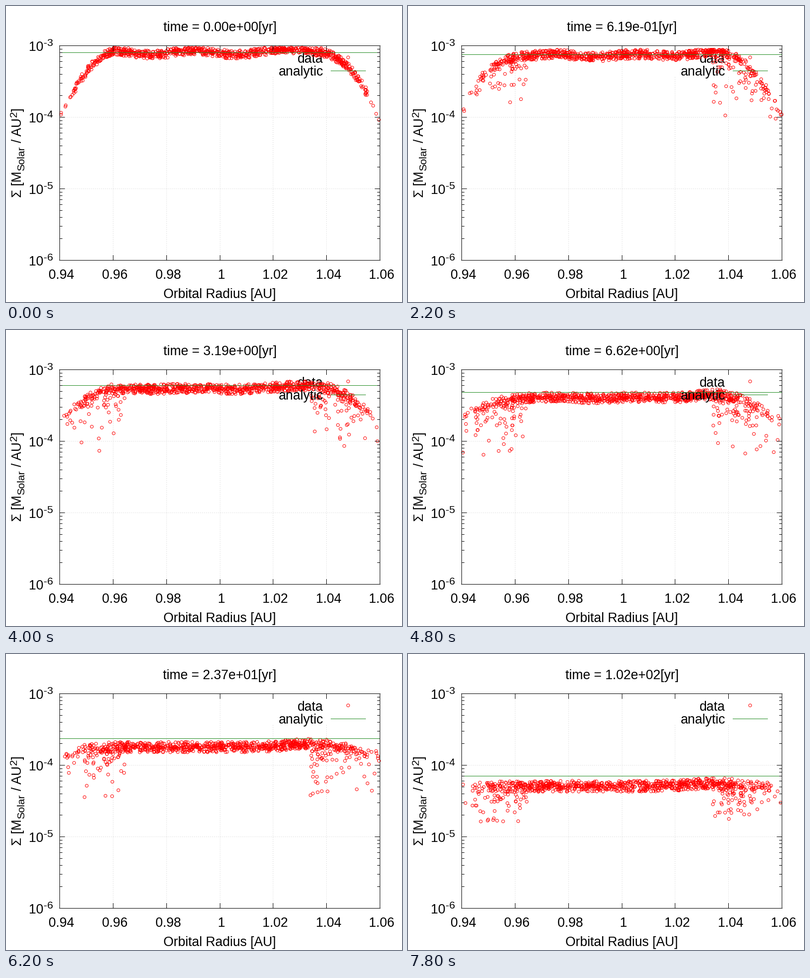
Write a matplotlib script that moves like this. It is 800 by 600 pixels and loops after 8000 ms.

```python
import numpy as np
import matplotlib.pyplot as plt
from matplotlib.animation import FuncAnimation

W, H, DPI = 800, 600, 100
PX = 72 / DPI                      # one pixel in points
FRAMES, STEP = 40, 200
LEFT, RIGHT, TOP, BOTTOM = 108.5, 755.5, 80.5, 515.5
DECADE = (BOTTOM - TOP) / 3
BIG, SMALL = 26.67, 21.33          # font sizes in pixels
RED, GREEN = "#ff0000", "#228b22"

plt.rcParams["font.family"] = "Liberation Sans"

fig = plt.figure(figsize=(W / DPI, H / DPI), dpi=DPI, facecolor="white")
ax = fig.add_axes([0, 0, 1, 1])
ax.set_xlim(0, W)
ax.set_ylim(H, 0)
ax.axis("off")


def crisp(v):
    """Centre of the pixel that holds v."""
    return np.floor(v) + 0.5


def line(x0, y0, x1, y1, color="black", z=5, **kw):
    if x0 == x1:
        x0 = x1 = crisp(x0)
    else:
        y0 = y1 = crisp(y0)
    return ax.plot([x0, x1], [y0, y1], color=color, lw=PX, zorder=z,
                   snap=False, **kw)[0]


def text(x, y, s, ha="left", size=BIG, z=5, rot=0):
    return ax.text(x, y, s, ha=ha, va="baseline", fontsize=size * PX,
                   rotation=rot, rotation_mode="anchor", zorder=z)


def circles(x, y, z=2):
    return ax.scatter(x, y, s=(6 * PX) ** 2, facecolors="none",
                      edgecolors=RED, linewidths=PX, zorder=z)


def grid(x0, y0, x1, y1):
    line(x0, y0, x1, y1, "#c4c4c4", 0, linestyle=(0, (1, 3)), dash_capstyle="butt")


def draw_axes():
    for i in range(7):
        x = LEFT + i * (RIGHT - LEFT) / 6
        line(x, BOTTOM, x, BOTTOM - 10)
        line(x, TOP, x, TOP + 10)
        text(x + 3.7, 553, f"{0.94 + 0.02 * i:.3g}", "center")
        if 0 < i < 6:
            grid(x, 144 if i in (4, 5) else TOP, x, BOTTOM)   # gap behind the key

    for k in range(4):
        y = TOP + k * DECADE
        line(LEFT, y, LEFT + 10, y)
        line(RIGHT, y, RIGHT - 10, y)
        text(46.3, y + 10.5, "10")
        text(76, y + 0.5, f"-{k + 3}", size=SMALL)
        if k in (1, 2):
            grid(LEFT, y, RIGHT, y)
        if k < 3:
            for m in range(2, 10):
                ym = y + DECADE * (1 - np.log10(m))
                line(LEFT, ym, LEFT + 5, ym)
                line(RIGHT, ym, RIGHT - 5, ym)

    for y in (TOP, BOTTOM):
        line(LEFT - 0.5, y, RIGHT + 0.5, y)
    for x in (LEFT, RIGHT):
        line(x, TOP, x, BOTTOM)

    text(432, 592, "Orbital Radius [AU]", "center")
    text(31, 388, "Σ [M", rot=90)
    text(37.5, 334.5, "Solar", size=SMALL, rot=90)
    text(31, 277.3, "/ AU", rot=90)
    text(21.5, 225.4, "2", size=SMALL, rot=90)
    text(31, 213.5, "]", rot=90)


draw_axes()
title = text(432, 51, "", "center")
text(641, 115, "data", "right", z=1)
text(641, 141, "analytic", "right", z=3)
line(656.5, 131.5, 726.5, 131.5, GREEN, 4)
model = line(LEFT, 0, RIGHT, 0, GREEN, 4)
circles([691.2], [104.2])
points = circles([], [])

# Particles of a narrow disc on slightly eccentric orbits
COUNT = 1000
rng = np.random.default_rng(12)
home = rng.uniform(160, 711, COUNT)
swing = rng.rayleigh(37, COUNT)
phase = rng.uniform(0, 2 * np.pi, (3, COUNT))
rate = 2 * np.pi * (0.94 + 0.12 * (home - LEFT) / (RIGHT - LEFT)) ** -1.5


def model_y(t):
    return TOP - DECADE * np.log10(0.8 / (1 + t / 9.87))


def band_depth(x, t):
    """Distance of the particle band below the model line, in pixels."""
    level = 22 * t / (t + 7)
    bump = -6 * np.exp(-((x - 615) / 70) ** 2)
    wave = -4 * np.exp(-t / 8) * np.cos(2 * np.pi * t) * np.cos((x - 380) / 27)
    rim = np.maximum(np.maximum(230 - x, x - 628), 0) / 122
    return level + bump + wave + 125 * rim ** 2 / (1 + t / 4)


def particles(n, t):
    x = home + swing * np.cos(phase[0] + rate * t)
    noise = np.cos(phase[1] + rate * t) + np.cos(phase[2] + 1.6 * rate * t)
    depth = band_depth(x, t) + noise * (4.3 + n / 30)

    # near the rims some particles fall far below the band
    draw = np.random.default_rng([5, n])
    low = ((x < 240) | (x > 615)) & (draw.random(COUNT) < 0.4 * min(n / 4, 1))
    depth += low * draw.exponential(30, COUNT)

    # fold the extremes back inside the allowed range
    limit = 138 - 50 * (n / FRAMES) ** 4
    depth = limit - np.abs(limit - depth)
    depth = np.abs(depth + 10) - 10
    shown = (x > LEFT + 2) & (x <= RIGHT)
    return np.column_stack([x, model_y(t) + depth])[shown]


def update(n):
    t = 0.1 * 1.2 ** (n - 1) if n else 0.0
    title.set_text(f"time = {t:.2e}[yr]")
    model.set_ydata([crisp(model_y(t))] * 2)
    points.set_offsets(particles(n, t))
    return title, model, points


anim = FuncAnimation(fig, update, frames=FRAMES, interval=STEP,
                     init_func=lambda: update(0), repeat=True, repeat_delay=0)
plt.show()
```
